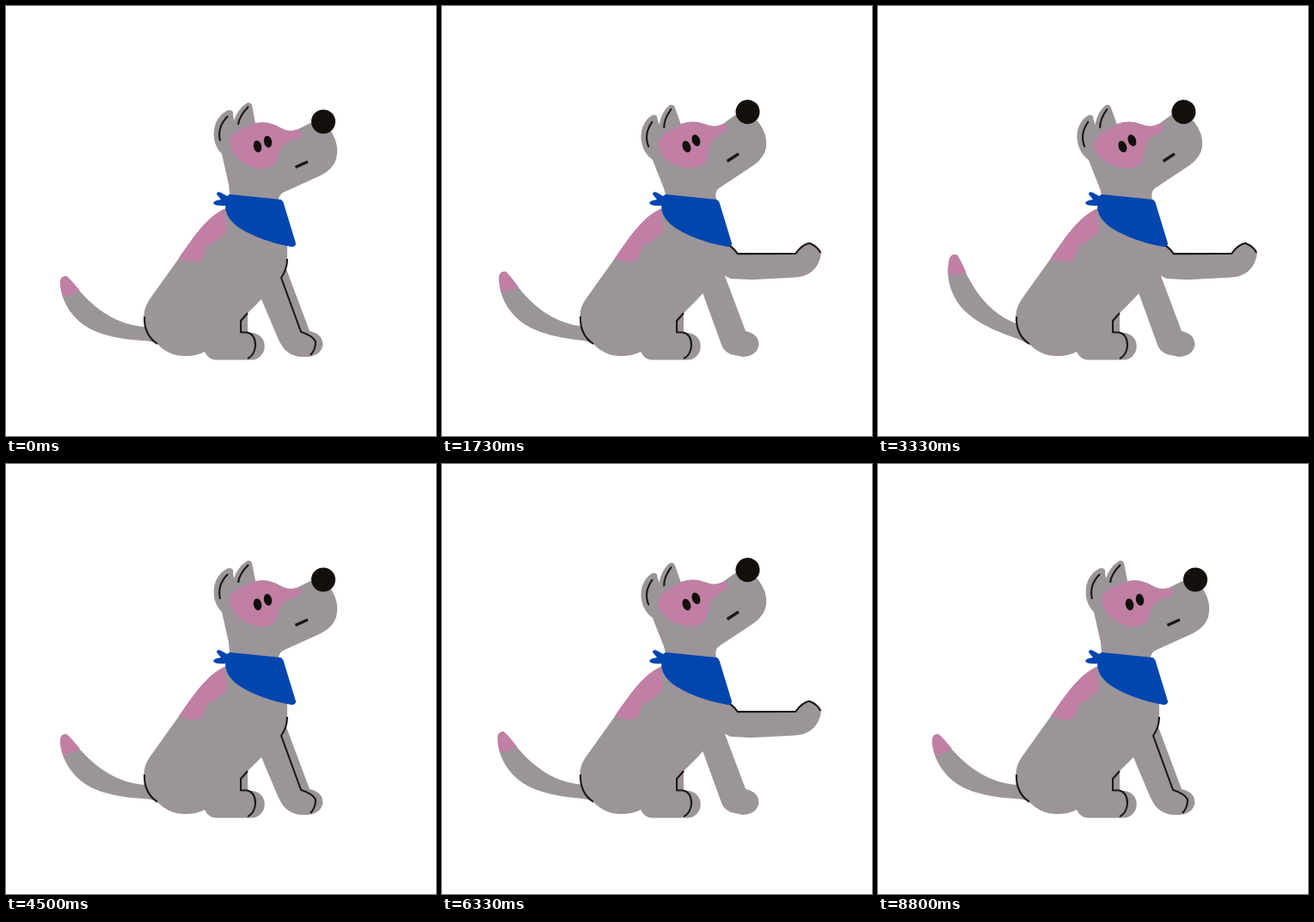
Write an HTML page that moves like this. It is 500 px wide and 500 px high and loops after 9.01 s.

```html
<!DOCTYPE html>
<html lang="en">
<head>
<meta charset="utf-8">
<title>Sitting dog</title>
<style>
  html, body { margin: 0; height: 100%; overflow: hidden; background: #fff; }
  svg { display: block; width: 100%; height: 100%; }
  .fur { fill: #9b9599; }
  .pink { fill: #c17fa5; }
  .blue { fill: #0046ae; }
  .ink { fill: #13100c; }
  .line { fill: none; stroke: #1d1715; stroke-width: 2.1; stroke-linejoin: round; }
</style>
</head>
<body>
<svg viewBox="0 0 500 500">
  <g id="tail">
    <path class="fur" d="M63 320Q64 314 70 314C78 320 82 328 88 334C109 357 134 372 164 373L182 375V393L165 389.500C140 388 112 385 92 372C72 358 63 338 63 320Z"/>
    <path class="pink" d="M63 320Q64 314 70 314Q78 321 86 331Q77 337 66 338Q63 328 63 320Z"/>
  </g>

  <path class="fur" d="M300 325L326 306L353 378Q368 381 368.500 394Q366 407 350 408L336 405Q328 402 325 394Z"/>

  <path class="fur" d="M258 234C236 243 222 263 202 292L167 341C160 352 160 358 161 367C161 380 166 387 176 393C186 403 196 407 208 407Q222 407 231 402Q235 411 244 411.500H285A15.300 15.300 0 0 0 285 380L281 379V357L297 341L318 318Q328 308 327 294V270L320 225Z"/>
  <path class="pink" d="M257 235C236 243 222 263 201 293Q208 297 222 297Q230 296 231 284Q234 276 243 275Q248 268 256 265Q258 255 254 240Z"/>
  <path class="line" d="M161 361Q160 382 176 393"/>
  <path class="line" d="M281 357L273 366V379.500H280C288 381 290 388 290 395Q289 406 281 410"/>

  <g id="leg">
    <path class="fur" d="M290 318L297 341L316 386Q322 400 330 404Q340 410 354 407Q362 398 360 390Q356 382 343 379L320 316Q328 306 327 294L320 270L295 275Z"/>
    <path class="line" d="M327 294Q327 306 320 316L343 379Q356 383 360 390Q360 400 354 406"/>
  </g>

  <g id="head">
    <path class="fur" d="M261 228L259 208L251 172C239 160 240 142 246 132Q252 123 259 121Q265 121 264 126L265 133Q270 119 280 113Q284 111 286 115L290 136Q305 133 318 141Q328 147 338 144L360 133L379 147Q388 163 384 178Q380 190 366 197L322 217Q316 220 317 230Z"/>
    <path class="pink" d="M260 158Q262 146 278 142Q290 134 304 136C318 138 322 147 334 145Q340 142 343 147Q345 152 336 155Q322 158 318 168C314 184 310 189 297 189C280 188 262 175 260 158Z"/>
    <path class="line" d="M249 157Q245 141 258 128M270 138Q271 128 282 117"/>
    <circle class="ink" cx="369" cy="134.500" r="14"/>
    <path class="line" d="M336.500 187.500L351 181" style="stroke-width:3.500"/>
    <ellipse class="ink eye" rx="4.600" ry="7"/>
    <ellipse class="ink eye" rx="4.600" ry="7"/>
  </g>

  <path class="blue" d="M260 219L319 225Q322 226 323 230L337 276Q337 280 332 280C300 274 276 263 265 253Q255 244 255 232Q243 233 241 229Q242 226 250 225L245 219Q245 215 250 217L257 221Z"/>
</svg>
<script>
const LOOP = 9010, HALF = 4500;
const tail = document.getElementById("tail");
const leg = document.getElementById("leg");
const head = document.getElementById("head");
const eyes = document.querySelectorAll(".eye");
const eyePos = [[292.5, 163.3], [304.5, 157.8]];

// start and end of each paw lift, in ms
const lifts = [[0, 930], [970, 2200], [2930, 3700]];

const clamp = x => Math.min(1, Math.max(0, x));
const smooth = x => { x = clamp(x); return x * x * (3 - 2 * x); };
const wave = (x, n = 1) => Math.sin(Math.PI * n * clamp(x)) ** 2;
const part = (t, [a, b]) => clamp((t - a) / (b - a));
const sum = f => lifts.reduce((total, span) => total + f(span), 0);
const turn = (el, deg, x, y) => el.setAttribute("transform", `rotate(${deg} ${x} ${y})`);

function draw(time) {
  const p = time % LOOP;
  const t = p < HALF ? p : p - HALF;

  const lift = sum(([a, b]) => smooth((t - a) / 350) * smooth((b - t) / 350));
  const wag = sum(span => wave(part(t, span), 3));
  turn(leg, -70 * lift, 312, 285);
  turn(head, -9 * lift, 290, 215);
  turn(tail, 16 * wag, 172, 382);

  const open = 1 - 0.7 * wave(part(t, [880, 1080]));
  eyes.forEach((eye, i) => eye.setAttribute("transform",
    `translate(${eyePos[i]}) rotate(-12) scale(1 ${open})`));
}

function frame() {
  draw(performance.now());
  requestAnimationFrame(frame);
}
frame();
</script>
</body>
</html>
```
